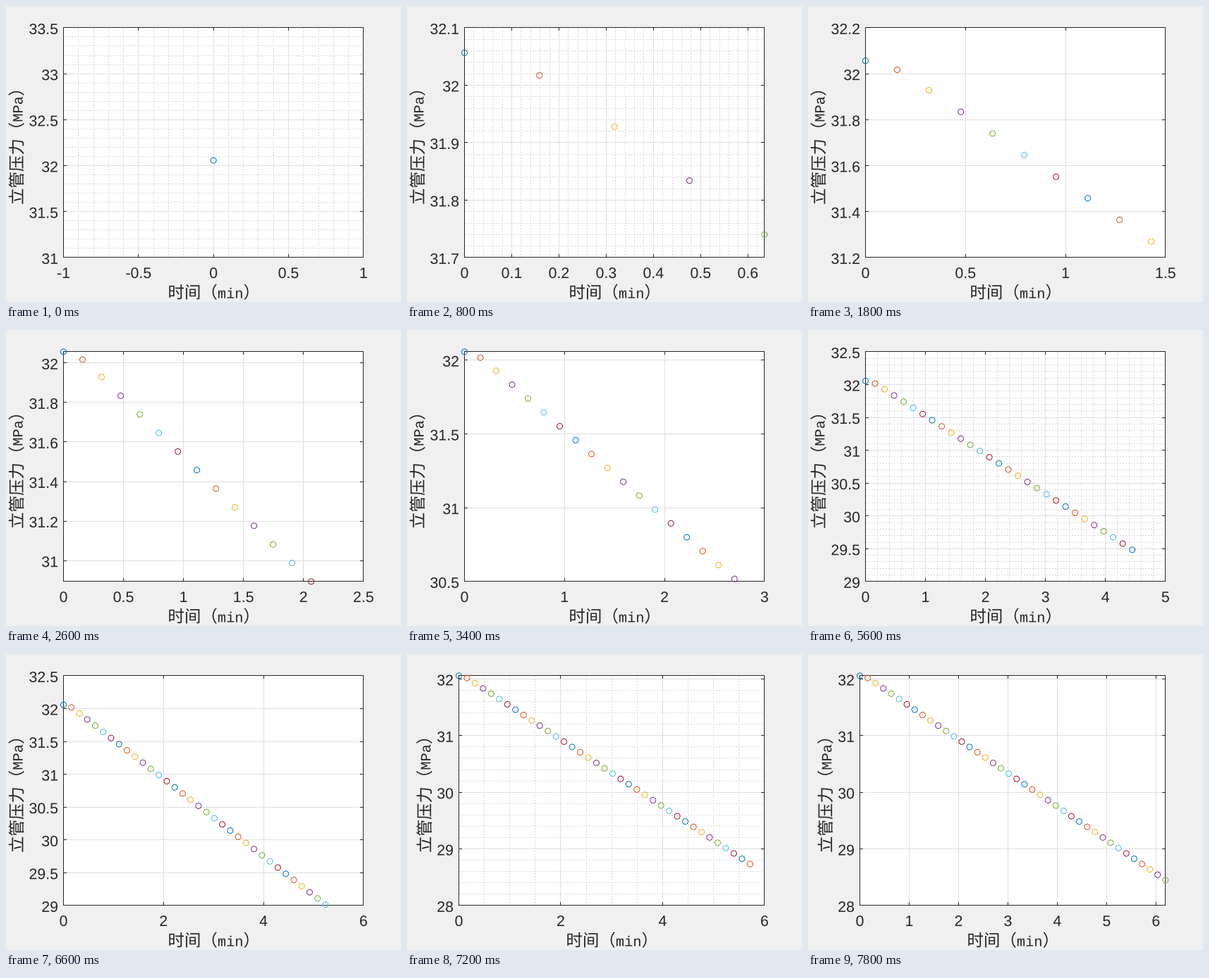
Write a matplotlib script that moves like this. It is 560 by 420 pixels and loops after 8000 ms.

```python
import math

import matplotlib.pyplot as plt
import numpy as np
from matplotlib.animation import FuncAnimation
from matplotlib.patches import PathPatch, Rectangle
from matplotlib.textpath import TextPath
from matplotlib.transforms import Affine2D

W, H, DPI = 560, 420, 100
PX = 72 / DPI                       # one pixel in points
FRAMES, INTERVAL = 40, 200

RIGHT, TOP, BOTTOM = 506.8, 30.9, 356.9
MIN_LEFT = 73
TICK_EM, LABEL_EM = 21.33, 23.47
LATIN = 0.52                        # advance of latin letters in the labels
INK = (0.15, 0.15, 0.15)
GRID = (0.8725,) * 3
MINOR = (0.85,) * 3
COLORS = ["#0072BD", "#D95319", "#EDB120", "#7E2F8E",
          "#77AC30", "#4DBEEE", "#A2142F"]

# candidate tick steps as (mantissa, step)
STEPS = [(m, m * 10.0 ** e) for e in range(-3, 2) for m in (1, 2, 5)]
X_CAPS = {1: 5, 2: 5, 5: 5}
Y_CAPS = {1: 7, 2: 6, 5: 7}
EPS = 1e-6

index = np.arange(FRAMES)
times = 0.1588 * index
pressure = 31.834 - 0.094 * (index - 3)
pressure[:3] = 32.0565, 32.017, 31.928

fig = plt.figure(figsize=(W / DPI, H / DPI), dpi=DPI, facecolor="#F0F0F0")
ax = fig.add_axes([0, 0, 1, 1])


def auto_axis(lo, hi, caps):
    """Round the limits to ticks unless that leaves too much empty space."""
    if lo == hi:
        lo, hi = lo - 1, hi + 1
    for m, step in STEPS:
        a = math.floor(lo / step + EPS) * step
        b = math.ceil(hi / step - EPS) * step
        if round((b - a) / step) <= caps[m]:
            break
    slack = 0.25 * (hi - lo)
    low_loose, high_loose = lo - a > slack, b - hi > slack
    if low_loose:
        a = lo
    if high_loose:
        b = hi
    if low_loose or high_loose:
        m, step = next(s for s in STEPS if (b - a) / s[1] <= 6.5)
    return a, b, step, step / (4 if m == 2 else 5)


def multiples(a, b, step):
    first, last = math.ceil(a / step - EPS), math.floor(b / step + EPS)
    return np.arange(first, last + 1) * step


def between(a, b, sub, step):
    """Minor positions that do not fall on a major tick."""
    v = multiples(a, b, sub)
    return v[np.abs(v / step - np.round(v / step)) > 0.01]


def tick_text(v):
    return f"{v:.3f}".rstrip("0").rstrip(".")


def tick_width(s):
    return TICK_EM * sum({".": 0.278, "-": 0.333}.get(c, 0.556) for c in s)


def put_text(s, x, y, size, family, angle=0, shift=0):
    path = TextPath((shift, 0), s, size=size, prop={"family": family})
    move = Affine2D().rotate_deg(angle).scale(1, -1).translate(x, y)
    ax.add_patch(PathPatch(move.transform_path(path), fc=INK, lw=0, zorder=5))


def put_label(han, latin, x, y, angle=0):
    """Full-width text with narrow latin letters inside brackets."""
    em = LABEL_EM
    n, k = len(han) + 1, len(latin)
    start = -(n + 0.5 * k + 1) * em / 2
    pieces = [(han + "（", 0, em, "Noto Sans CJK JP"),
              (latin, n, em * LATIN / 0.6, "Liberation Mono"),
              ("）", n + LATIN * k, em, "Noto Sans CJK JP")]
    for s, offset, size, family in pieces:
        put_text(s, x, y, size, family, angle, start + offset * em)


def pixel(v):
    return np.floor(v + EPS) + 0.5


def verticals(xs, y0, y1, color, z, dash="solid"):
    ax.vlines(xs, y0, y1, colors=[color], lw=PX, linestyles=[dash],
              zorder=z, snap=False)


def horizontals(ys, x0, x1, color, z, dash="solid"):
    ax.hlines(ys, x0, x1, colors=[color], lw=PX, linestyles=[dash],
              zorder=z, snap=False)


def draw(i):
    ax.clear()
    ax.set(xlim=(0, W), ylim=(H, 0))
    ax.axis("off")

    xs, ys = times[:i + 1], pressure[:i + 1]
    xa, xb, xstep, xsub = auto_axis(xs.min(), xs.max(), X_CAPS)
    ya, yb, ystep, ysub = auto_axis(ys.min(), ys.max(), Y_CAPS)
    xticks, yticks = multiples(xa, xb, xstep), multiples(ya, yb, ystep)

    label_w = max(tick_width(tick_text(v)) for v in yticks)
    left = max(MIN_LEFT, round(39.5 + label_w)) + 0.5
    x0, x1, y0, y1 = pixel(np.array([left, RIGHT, TOP, BOTTOM]))

    def to_x(v):
        return left + (v - xa) / (xb - xa) * (RIGHT - left)

    def to_y(v):
        return BOTTOM - (v - ya) / (yb - ya) * (BOTTOM - TOP)

    ax.add_patch(Rectangle((x0, y0), x1 - x0, y1 - y0,
                           fc="white", lw=0, zorder=0))

    # the minor grid toggles with every new point
    if i % 2 == 0:
        dots = (0, (2, 2))
        verticals(pixel(to_x(between(xa, xb, xsub, xstep))),
                  y0 + 0.5, y1, MINOR, 1, dots)
        horizontals(pixel(to_y(between(ya, yb, ysub, ystep))),
                    x0 + 0.5, x1, MINOR, 1, dots)

    tx, ty = pixel(to_x(xticks)), pixel(to_y(yticks))
    verticals(tx, y0, y1, GRID, 2)
    horizontals(ty, x0, x1, GRID, 2)
    for edge, sign in ((y0, 1), (y1, -1)):
        verticals(tx, edge, edge + 4.5 * sign, INK, 3)
    for edge, sign in ((x0, 1), (x1, -1)):
        horizontals(ty, edge, edge + 4.5 * sign, INK, 3)
    verticals([x0, x1], y0 - 0.5, y1 + 0.5, INK, 3)
    horizontals([y0, y1], x0 - 0.5, x1 + 0.5, INK, 3)

    for v in xticks:
        s = tick_text(v)
        put_text(s, to_x(v) - tick_width(s) / 2, 386, TICK_EM,
                 "Liberation Sans")
    for v in yticks:
        s = tick_text(v)
        put_text(s, left - 7.5 - tick_width(s), to_y(v) + 9, TICK_EM,
                 "Liberation Sans")

    put_label("时间", "min", (x0 + x1) / 2, 414.5)
    put_label("立管压力", "MPa", left - 16.5 - label_w,
              (y0 + y1) / 2 + 0.5, 90)

    ax.scatter(to_x(xs), to_y(ys), s=(8 * PX) ** 2, facecolors="none",
               edgecolors=[COLORS[k % 7] for k in range(i + 1)],
               linewidths=PX, zorder=6)
    return []


anim = FuncAnimation(fig, draw, frames=FRAMES, interval=INTERVAL,
                     init_func=lambda: [], repeat=True, repeat_delay=0)
plt.show()
```
